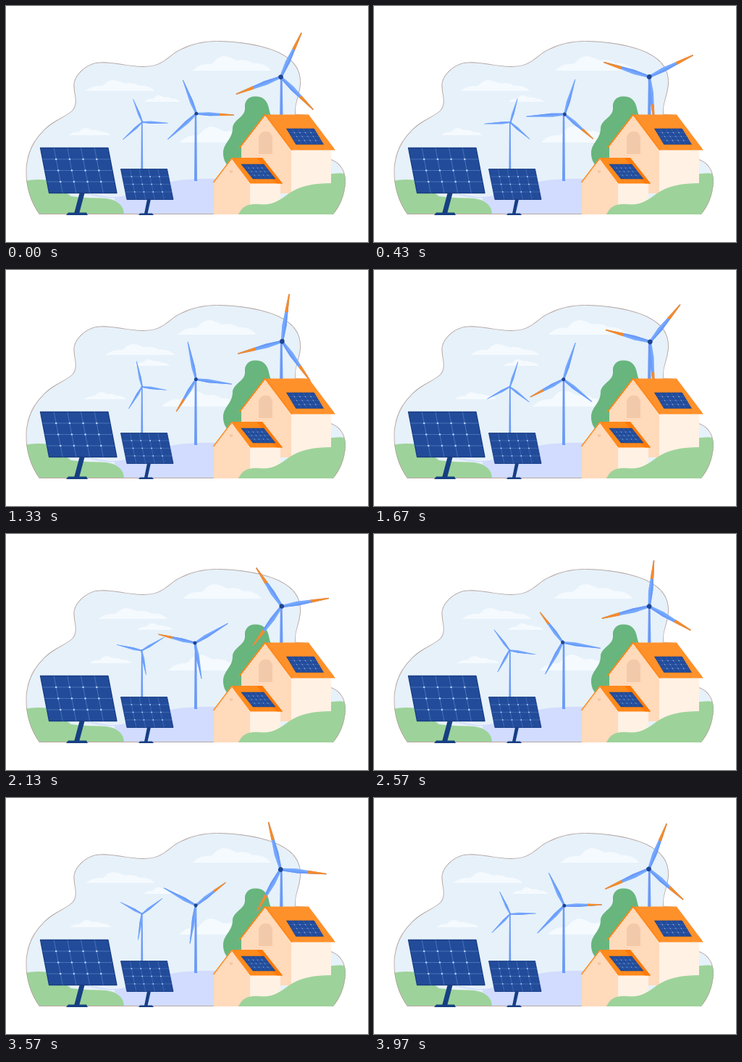
Animation, 500 px wide and 325 px high, one loop 4010 ms. Source, as an HTML page:

```html
<!DOCTYPE html>
<html lang="en">
<head>
<meta charset="utf-8">
<title>Clean energy</title>
<style>
html, body { margin: 0; width: 100%; height: 100%; overflow: hidden; background: #fff; }
svg { display: block; width: 500px; height: 325px; }
</style>
</head>
<body>
<svg viewBox="0 0 500 325">
  <defs>
    <path id="blob" d="M46 287C34 270 27 250 27.500 225C29 202 37 186 50 173C64 157 84 152 92 143C101 131 91 118 94 104C97 94 108 82 124 78C146 75 164 83 190 83C218 83 222 69 240 60C258 51 276 47.500 296 48C324 49 346 52 368 60C392 69 406 82 407 102C408 120 398 134 400 149L418 150L449 198V211C462 216 469 226 469 242C468 262 461 276 452 287Z"/>
    <clipPath id="inside"><use href="#blob"/></clipPath>
    <path id="cloud" d="M0 20C6 13 14 10 23 11C28 9 29 2 39 0C49 0 53 6 58 6C66 4 74 7 77 10C88 9 97 14 100 20Z"/>
  </defs>

  <g clip-path="url(#inside)">
    <use href="#blob" fill="#e6f1fa"/>
    <g id="clouds" fill="#f5fafe"/>
    <path d="M100 258C125 258 140 266 160 262C195 256 215 241 250 239Q275 237 300 238V287H100Z" fill="#d1dcff"/>
    <path d="M100 258C118 258 130 266 150 264L150 275H95Z" fill="#e6f1fa"/>
    <path d="M20 243Q35 237 60 240L90 262C115 265 125 264 138 265C154 267 163 275 163 287H20Z" fill="#9dd39a"/>
    <path d="M440 233Q456 229 470 231V287H440Z" fill="#9dd39a"/>
    <use href="#blob" fill="none" stroke="#b9a8a4" stroke-width="1.800"/>
  </g>

  <g id="far"/>
  <path d="M345 124.500C335 124 329 131 330 140C331 153 314 156 313 168C313 184 300 188 300 203C300 213 305 220 312 224L360 210L366 150C362 145 365 125 345 124.500Z" fill="#68b57d"/>
  <g id="near"/>

  <g id="houses">
    <path d="M358 150L325 193V258H395V198Z" fill="#ffdabb"/>
    <path d="M394 198H449V262H394Z" fill="#fff1e4"/>
    <path d="M358 149.500H418L455 198.500H395Z" fill="#ff912b"/>
    <path d="M322 196L358 149.500L395 198.500" fill="none" stroke="#ff8614" stroke-width="1.800"/>
    <path d="M349 204V182a9.500 9.500 0 0 1 19 0V204Z" fill="#f3caa9"/>
    <path d="M312 210L287 242V287H338V244Z" fill="#ffdabb"/>
    <path d="M337 244H379V287H337Z" fill="#fff1e4"/>
    <path d="M312 209H354L382 244.500H338Z" fill="#ff8a1c"/>
    <path d="M346 209H354L382 244.500H374Z" fill="#ff7a08"/>
    <path d="M286.500 243L312 209.500L338 244" fill="none" stroke="#ff8a1c" stroke-width="1.400"/>
    <circle cx="311" cy="228" r="2.300" fill="#f3caa9"/>
  </g>
  <path d="M321 287C327 274 337 272 350 273C368 275 377 268 391 258C407 247 427 244 449 244L462 262L452 287Z" fill="#9dd39a"/>

  <g fill="#173f82">
    <path d="M102 256H109L101 286H94Z"/>
    <path d="M83 288L86 284.500H111L113 288Z"/>
    <path d="M195 266H200L195.500 286H191Z"/>
    <path d="M183 288L185 285.500H202L204 288Z"/>
  </g>
  <g id="panels"/>
</svg>
<script>
const LOOP = 4010;
const $ = id => document.getElementById(id);

function add(parent, tag, attrs) {
  const el = document.createElementNS("http://www.w3.org/2000/svg", tag);
  for (const key in attrs) el.setAttribute(key, attrs[key]);
  parent.append(el);
  return el;
}

// Solar panel: a sheared grid with its top-left corner at x, y.
function panel(parent, x, y, w, h, skew, cols, rows, dot) {
  const at = (u, v) => [x + u * w + v * skew, y + v * h];
  const line = (a, b) => `M${a}L${b}`;
  add(parent, "path", {
    d: `M${at(0, 0)}L${at(1, 0)}L${at(1, 1)}L${at(0, 1)}Z`,
    fill: "#224c9a", stroke: "#183c82", "stroke-width": dot, "stroke-linejoin": "round"
  });
  let grid = "";
  for (let c = 1; c < cols; c++) grid += line(at(c / cols, 0), at(c / cols, 1));
  for (let r = 1; r < rows; r++) grid += line(at(0, r / rows), at(1, r / rows));
  add(parent, "path", { d: grid, stroke: "#5f84cb", "stroke-width": dot * 0.5 });
  for (let c = 1; c < cols; c++)
    for (let r = 1; r < rows; r++) {
      const [cx, cy] = at(c / cols, r / rows);
      add(parent, "circle", { cx, cy, r: dot, fill: "#b5d2fb" });
    }
}
panel($("panels"), 47.5, 195.5, 93.5, 62, 12, 5, 4, 1.3);
panel($("panels"), 158.5, 224.5, 64, 42, 8.5, 5, 4, 0.9);
panel($("houses"), 387.5, 169, 38, 21.5, 13, 5, 4, 0.6);
panel($("houses"), 325, 218, 31, 20, 16, 5, 4, 0.55);

// Turbine: pivot cx, cy; the hub sits slightly off the pivot.
function turbine(parent, o) {
  const { cx, cy, dx, dy, base, tower, size, turn, tips, hub } = o;
  add(parent, "path", {
    d: `M${cx - tower * 0.6} ${cy}H${cx + tower * 0.6}L${cx + tower} ${base}H${cx - tower}Z`,
    fill: "#6c9af5"
  });
  const rotor = add(parent, "g", {});
  const head = add(rotor, "g", {
    transform: `translate(${cx + dx} ${cy + dy}) rotate(${turn}) scale(${size})`
  });
  [[-112, 50], [2, 52], [138, 53]].forEach(([angle, len], i) => {
    const blade = add(head, "g", { transform: `rotate(${angle})` });
    add(blade, "path", { d: `M0 -1.300L17 -2.600L${len} -.5V.5L18 2.300L0 1.300Z`, fill: "#75a8ff" });
    add(blade, "path", { d: `M0 0L${len} 0V.5L18 2.300L0 1.300Z`, fill: "#6a9bf8" });
    if (tips.includes(i))
      add(blade, "path", { d: `M${len - 20} -1.800L${len} -.6V.6L${len - 20} 1.700Z`, fill: "#f58b2b" });
  });
  add(head, "circle", { r: hub.r, fill: hub.fill });
  return a => rotor.setAttribute("transform", `rotate(${a} ${cx} ${cy})`);
}
const navy = "#1f4690";
const spins = [
  turbine($("far"), { cx: 187.8, cy: 160.3, dx: 0.4, dy: -0.4, base: 225, tower: 1.4, size: 0.68,
    turn: 0, tips: [], hub: { r: 2, fill: "#6c9af5" } }),
  turbine($("far"), { cx: 262, cy: 149.3, dx: 0.9, dy: -1, base: 241, tower: 2, size: 1,
    turn: 0, tips: [1], hub: { r: 2.5, fill: navy } }),
  turbine($("near"), { cx: 380.3, cy: 98.6, dx: -0.7, dy: -0.8, base: 152, tower: 2.2, size: 1.27,
    turn: 157, tips: [0, 1, 2], hub: { r: 2.6, fill: navy } })
];

// Drift curves as [time, amount].
const early = [[0, 0], [430, 0.36], [970, 0.98], [1180, 1.02], [1670, 0.83], [2570, 0.43], [3130, 0.08], [3970, 0], [LOOP, 0]];
const late = [[0, 0], [430, 0.19], [970, 0.59], [1670, 0.87], [2250, 1.02], [2570, 1], [3130, 0.21], [3970, 0], [LOOP, 0]];

// Cubic through the points, flat at turning points.
function follow(points, t) {
  const slope = (a, b) => (b[1] - a[1]) / (b[0] - a[0]);
  const tangent = i => {
    if (!i || i === points.length - 1) return 0;
    const l = slope(points[i - 1], points[i]), r = slope(points[i], points[i + 1]);
    return l * r > 0 ? 2 * l * r / (l + r) : 0;
  };
  let i = 0;
  while (i < points.length - 2 && t > points[i + 1][0]) i++;
  const [a, b] = [points[i], points[i + 1]];
  const d = b[0] - a[0], u = (t - a[0]) / d, e = u * u * (3 - 2 * u);
  return a[1] + (b[1] - a[1]) * e
    + d * u * (1 - u) * (tangent(i) * (1 - u) - tangent(i + 1) * u);
}

const clouds = [
  { x: 258, y: 69, w: 108, h: 20, move: -21, path: early },
  { x: 110, y: 102, w: 95, h: 15, move: 28, path: early },
  { x: 191, y: 123, w: 49, h: 9, move: -14.5, path: early },
  { x: 87, y: 168, w: 57, h: 10, move: 28.5, path: late },
  { x: 240, y: 166, w: 108, h: 22, move: -25, path: early }
];
for (const c of clouds) c.el = add($("clouds"), "use", { href: "#cloud" });

function draw(now) {
  const t = now % LOOP;
  spins.forEach(spin => spin(360 * t / LOOP));
  for (const { el, x, y, w, h, move, path } of clouds)
    el.setAttribute("transform",
      `translate(${x + move * follow(path, t)} ${y}) scale(${w / 100} ${h / 20})`);
}

const start = performance.now();
function tick() {
  draw(performance.now() - start);
  requestAnimationFrame(tick);
}
tick();
</script>
</body>
</html>
```
